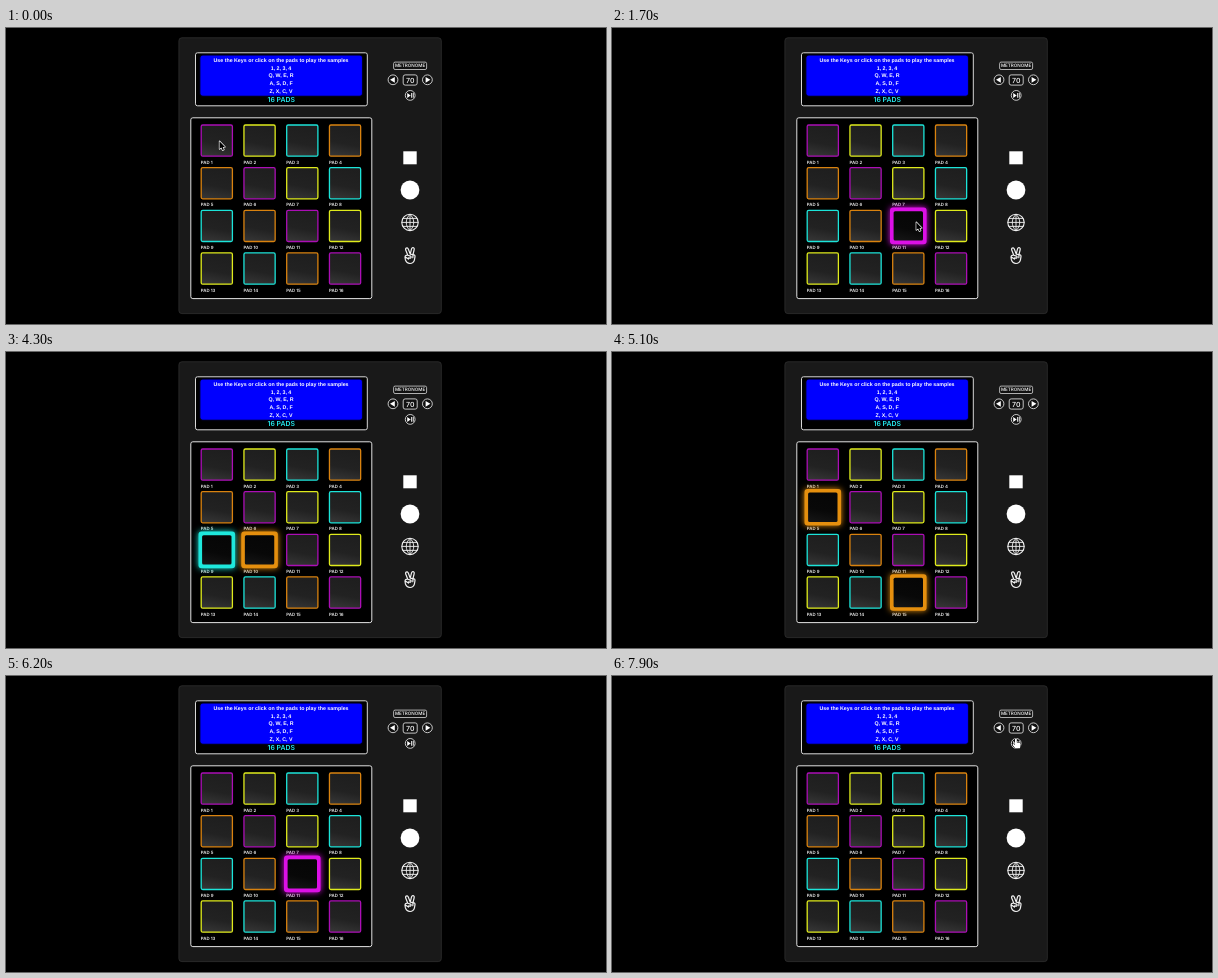
Animation of 600 by 296 pixels, one loop 8000 ms. Source, as an HTML page with a canvas:

```html
<!DOCTYPE html>
<html lang="en">
<head>
<meta charset="utf-8">
<title>16 Pads</title>
<style>
  html, body { margin: 0; width: 100%; height: 100%; overflow: hidden; background: #000; }
  canvas { display: block; width: 600px; height: 296px; }
</style>
</head>
<body>
<canvas id="stage"></canvas>
<script>
const LOOP = 8000, STEP = 100;
const canvas = document.getElementById('stage');
const ctx = canvas.getContext('2d');
const ratio = window.devicePixelRatio || 1;
canvas.width = 600 * ratio;
canvas.height = 296 * ratio;
ctx.scale(ratio, ratio);
ctx.textRendering = 'geometricPrecision';

const SANS = 'Inter, sans-serif';
const KEYS = '1234QWERASDFZXCV';
const DIM = ['#ab0eb5', '#dfeb1c', '#1ce4d9', '#d9820f'];
const BRIGHT = ['#dc10e6', '#e2ec18', '#1ee9dd', '#e58f0e'];

// Three clicks, then chords typed on a steady beat
const HOLD = 280, BEAT = 325, TYPING = 3900;
const CHORDS = 'A AS D QC WF QWFC A D SF D'.split(' ');
const HITS = [
  { keys: '1', at: 100 }, { keys: 'D', at: 1700 }, { keys: '4', at: 2900 },
  ...CHORDS.map((keys, i) => ({ keys, at: TYPING + i * BEAT }))
];

const HOME = { x: 213.5, y: 113.2 };
const MOVES = [
  { from: 500, to: 1400, x: 304.3, y: 194.2 },
  { from: 2200, to: 2700, x: 337, y: 112 },
  { from: 6900, to: 7300, x: 387, y: 58 },
  { from: 7300, to: 7800, x: 403, y: 63 }
];

function paint(fill, stroke, line = 1) {
  if (fill) { ctx.fillStyle = fill; ctx.fill(); }
  if (stroke) { ctx.strokeStyle = stroke; ctx.lineWidth = line; ctx.stroke(); }
}

function box(x, y, w, h, r, fill, stroke, line) {
  ctx.beginPath();
  ctx.roundRect(x, y, w, h, r);
  paint(fill, stroke, line);
}

function circle(x, y, r, fill, stroke, line) {
  ctx.beginPath();
  ctx.arc(x, y, r, 0, Math.PI * 2);
  paint(fill, stroke, line);
}

function shape(x, y, d, fill, stroke, line = 1) {
  const path = new Path2D(d);
  ctx.save();
  ctx.translate(x, y);
  ctx.lineJoin = ctx.lineCap = 'round';
  if (stroke) { ctx.strokeStyle = stroke; ctx.lineWidth = line; ctx.stroke(path); }
  if (fill) { ctx.fillStyle = fill; ctx.fill(path); }
  ctx.restore();
}

function label(text, x, y, font, color = '#fff', align = 'center') {
  ctx.font = font;
  ctx.fillStyle = color;
  ctx.textAlign = align;
  ctx.fillText(text, x, y);
}

function drawDisplay() {
  box(189.5, 24.8, 171.8, 53, 2, '#000', '#d8d8d8');
  ctx.save();
  ctx.shadowColor = '#0000ff';
  ctx.shadowBlur = 1.5 * ratio;
  box(194.6, 27.8, 161.2, 39.8, 2, '#0000ff');
  ctx.restore();
  const lines = ['Use the Keys or click on the pads to play the samples'];
  for (let i = 0; i < 16; i += 4) lines.push([...KEYS.slice(i, i + 4)].join(', '));
  lines.forEach((line, i) =>
    label(line, 275, 34.2 + i * 7.6, 'bold 5.3px "Liberation Sans", sans-serif'));
  label('16 PADS', 275.2, 74.4, `600 6.9px ${SANS}`, '#25e9ef');
}

function drawMetronome() {
  box(387.6, 34.1, 33, 7.4, 1.5, '#111', '#d8d8d8', 0.8);
  label('METRONOME', 404.1, 39.4, `500 4.6px ${SANS}`);
  box(397.2, 46.9, 14, 10.2, 2, '#111', '#d8d8d8', 0.9);
  label('70', 404.2, 54.5, `500 7px ${SANS}`);
  const arrow = 'M-3 0 L1.8 -2.9 V2.9 Z';
  for (const side of [-1, 1]) {
    const x = 404.2 + side * 17.2;
    circle(x, 51.8, 4.9, '#111', '#ddd', 0.9);
    ctx.save();
    ctx.translate(x, 51.8);
    ctx.scale(-side, 1);
    shape(0, 0, arrow, '#fff');
    ctx.restore();
  }
  circle(404.2, 67.4, 4.9, '#111', '#ddd', 0.9);
  shape(404.2, 67.4, 'M-3 -2.5 L.5 0 L-3 2.5 Z M1 -2.4 h.9 v4.8 h-.9 Z M2.6 -2.4 h.9 v4.8 h-.9 Z', '#fff');
}

function drawLinks() {
  box(397.3, 123.3, 13.4, 13, 0, '#fff');
  circle(404, 162, 9.4, '#fff');
  circle(404, 194.4, 8.2, null, '#f2f2f2', 1.1);
  shape(404, 194.4,
    'M0 -8 V8 M-8 0 H8 M-7 -4 H7 M-7 4 H7 M0 -8 C-5 -4 -5 4 0 8 C5 4 5 -4 0 -8',
    null, '#f2f2f2', 0.9);
  // Victory hand
  shape(404, 227.7,
    'M-2.2 -.5 L-4.4 -6 Q-4.5 -8 -2.8 -7.8 Q-2 -7.5 -1.6 -6.4 L.2 -1.6 ' +
    'L1.6 -7 Q2.2 -8.5 3.6 -7.9 Q4.5 -7.4 4.2 -6.2 L3 -1 ' +
    'Q5.2 -1 5 1 L4.4 4.4 Q3.3 7.8 0 7.8 Q-3.4 7.6 -4.6 4 L-5 1.4 Q-4.8 -.8 -2.2 -.5 ' +
    'L.5 .4 Q1.8 1.4 .4 2.5 L-1.4 2.2 M-4.7 1.2 L-1.5 3.4 M.2 -1.6 L3 -1 L2.8 2',
    null, '#f2f2f2', 1.2);
}

function padCenter(i) {
  const col = i % 4, row = i >> 2;
  return { x: 210.8 + col * 42.75, y: 112.6 + row * 42.65, hue: (col - row + 4) % 4 };
}

function drawPad(i, lit) {
  const { x, y, hue } = padCenter(i);
  const half = lit ? 14.7 : 15.6;
  ctx.save();
  ctx.translate(x, y);
  if (lit) {
    ctx.shadowColor = BRIGHT[hue];
    ctx.shadowBlur = 6 * ratio;
    box(-18.3, -18.3, 36.6, 36.6, 3, BRIGHT[hue]);
    ctx.shadowBlur = 0;
  }
  const shade = ctx.createLinearGradient(3, -half, -3, half);
  shade.addColorStop(0, lit ? '#060606' : '#1e1e1e');
  shade.addColorStop(0.6, lit ? '#080808' : '#222');
  shade.addColorStop(1, lit ? '#141414' : '#343434');
  box(-half, -half, half * 2, half * 2, 1.5, shade, lit ? null : DIM[hue], 1.3);
  ctx.restore();
}

function drawPads(t) {
  box(184.8, 89.8, 181, 180.8, 2, '#000', '#e2e2e2');
  const pressed = HITS.filter(hit => t >= hit.at && t < hit.at + HOLD).map(hit => hit.keys).join('');
  const pads = [...KEYS.keys?.() ?? Array(KEYS.length).keys()];
  const isLit = i => pressed.includes(KEYS[i]);
  for (const i of pads) {
    const { x, y } = padCenter(i);
    label(`PAD ${i + 1}`, x - 16, y + 23, `600 4.4px ${SANS}`, '#f2f2f2', 'left');
  }
  pads.filter(i => !isLit(i)).forEach(i => drawPad(i, false));
  pads.filter(isLit).forEach(i => drawPad(i, true));
}

function cursorAt(t) {
  return MOVES.reduce((at, move) => {
    const p = Math.min(1, Math.max(0, (t - move.from) / (move.to - move.from)));
    const ease = p * p * (3 - 2 * p);
    return { x: at.x + (move.x - at.x) * ease, y: at.y + (move.y - at.y) * ease };
  }, HOME);
}

function drawCursor(t) {
  if (t >= TYPING && t < 6900) return;
  const { x, y } = cursorAt(t);
  if (t >= 7700)
    shape(x, y,
      'M0 0 Q1 -1 1.8 .2 V3.4 L4.2 3.8 Q5.8 4 5.6 5.4 L5 9.2 H.2 L-2.4 5.9 Q-2.2 4.8 -1 5.2 L0 6 Z',
      '#fff', '#111');
  else
    shape(x, y, 'M0 0 V7.8 L1.8 6.2 L3.1 9 L4.4 8.4 L3.2 5.7 H5.5 Z', '#000', '#fff', 1.3);
}

function render(now) {
  const t = Math.floor(now % LOOP / STEP) * STEP;
  ctx.fillStyle = '#000';
  ctx.fillRect(0, 0, 600, 296);
  box(172.9, 9.8, 262.4, 275.8, 3, '#191919', '#2c2c2c', 0.9);
  drawDisplay();
  drawMetronome();
  drawLinks();
  drawPads(t);
  drawCursor(t);
}

const start = performance.now();
function tick() {
  render(performance.now() - start);
  requestAnimationFrame(tick);
}
tick();
</script>
</body>
</html>
```
